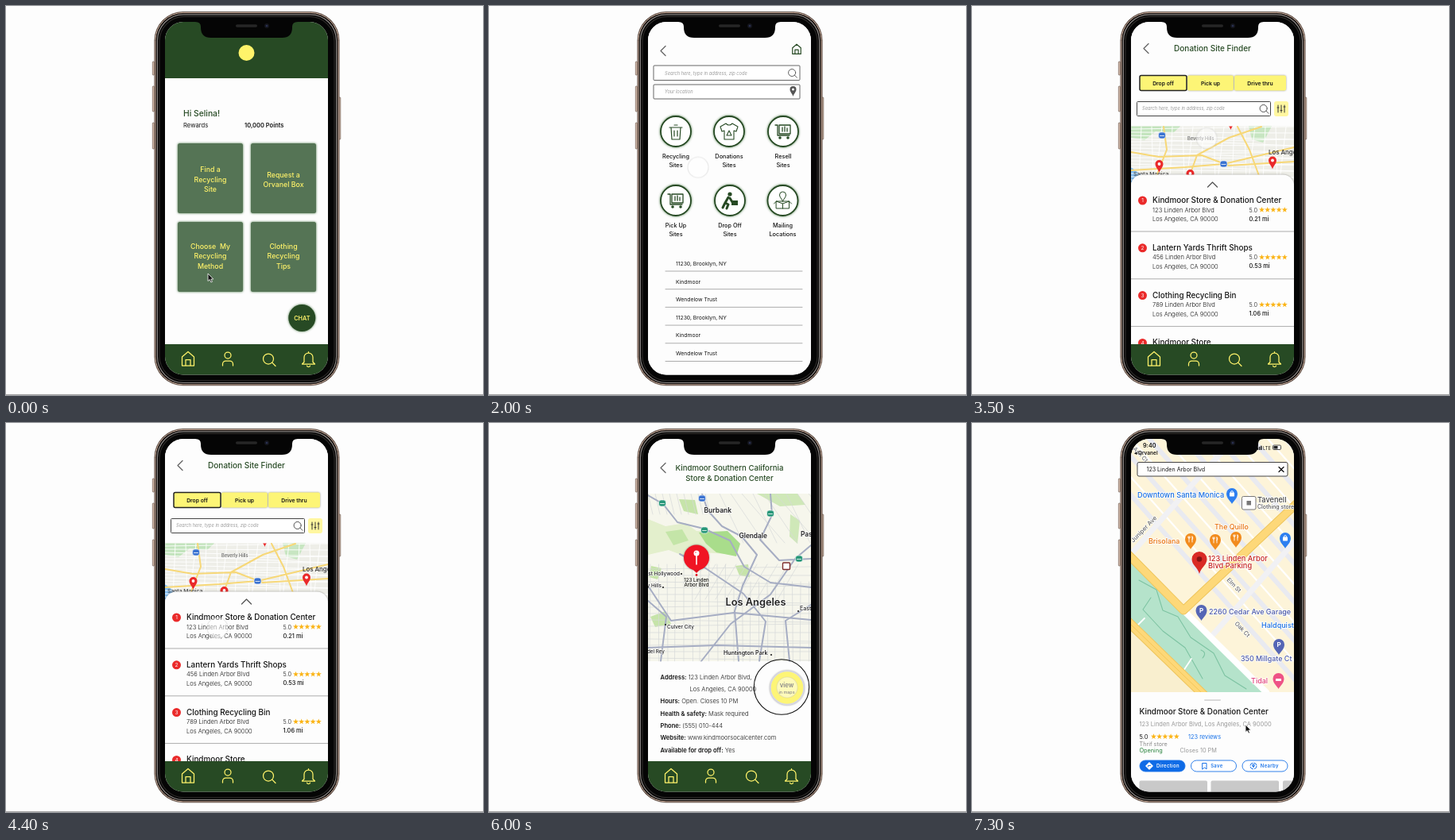
An HTML page that plays this animation: 600x490 px, repeating every 7400 ms.

```html
<!DOCTYPE html>
<html lang="en">
<head>
<meta charset="utf-8">
<title>Recycling app walkthrough</title>
<style>
html, body { margin: 0; width: 100%; height: 100%; overflow: hidden; background: #fdfdfd; }
svg { display: block; font-family: Inter, "Open Sans", sans-serif; }
text { white-space: pre; }
.glow { filter: drop-shadow(0 0 1.6px #4d7a4a); }
.soft { filter: drop-shadow(0 .6px 1.2px #0006); }
</style>
</head>
<body>
<svg id="stage" width="600" height="490" viewBox="0 0 600 490"></svg>
<script>
const LOOP = 7400, WIDTH = 205;
const GREEN = '#274a24', LEAF = '#557455', YELLOW = '#fdf576', LEMON = '#fff36a', RED = '#ea2a2a';

// Shape helpers, all returning SVG markup
const text = (x, y, size, str, o = {}) =>
  `<text x="${x}" y="${y}" font-size="${size}" font-weight="${o.w || 400}" fill="${o.fill || '#151515'}"` +
  ` text-anchor="${o.a || 'start'}" ${o.more || ''}>${str}</text>`;
const mid = (x, y, size, str, o = {}) => text(x, y, size, str, { ...o, a: 'middle' });
const box = (x, y, w, h, fill, r = 0, more = '') =>
  `<rect x="${x}" y="${y}" width="${w}" height="${h}" rx="${r}" fill="${fill}" ${more}/>`;
const dot = (x, y, r, fill, more = '') => `<circle cx="${x}" cy="${y}" r="${r}" fill="${fill}" ${more}/>`;
const area = (d, fill, more = '') => `<path d="${d}" fill="${fill}" ${more}/>`;
const line = (d, color = '#222', w = 1, more = '') =>
  `<path d="${d}" fill="none" stroke="${color}" stroke-width="${w}" stroke-linejoin="round" stroke-linecap="round" ${more}/>`;
const at = (x, y, inner, s = 1) => `<g transform="translate(${x} ${y}) scale(${s})">${inner}</g>`;
const outline = (color, w = 1) => `stroke="${color}" stroke-width="${w}"`;
const rule = (x1, x2, y, color = '#999') => line(`M${x1} ${y}H${x2}`, color, .8);

function stars(x, y) {
  let out = '';
  for (let i = 0; i < 5; i++) {
    const pts = Array.from({ length: 10 }, (_, k) => {
      const r = k % 2 ? 1.5 : 3.7, a = k * Math.PI / 5;
      return `${(x + i * 7.2 + r * Math.sin(a)).toFixed(2)},${(y - r * Math.cos(a)).toFixed(2)}`;
    });
    out += `<polygon points="${pts.join(' ')}" fill="#fbb416"/>`;
  }
  return out;
}

const HOUSE = 'M-7.5-2.5L0-9L7.5-2.5V8.5H-7.5ZM-3 8.5V1H3V8.5';
const LENS = 'M6 0a6.5 6.5 0 1 1-13 0a6.5 6.5 0 1 1 13 0M4.2 4.6L8.5 9';
const PERSON = 'M4-4.5a4 4 0 1 1-8 0a4 4 0 1 1 8 0M-6.5 8.5V6.5a4 4 0 0 1 4-4h5a4 4 0 0 1 4 4v2';
const BELL = 'M-5.5 4V-2a5.5 5.5 0 0 1 11 0V4L8 6.5H-8ZM-2 8.5a2 1.5 0 0 0 4 0M0-7.5V-9';
const pinMark = (x, y, s = 1, color = RED, core = '#fff') => at(x, y,
  area('M0 8C-1 4-5 1-5-3a5 5 0 0 1 10 0C5 1 1 4 0 8Z', color) + dot(0, -3, 1.9, core), s);
const back = line('M222 50.5L216 56.5L222 62.5', '#666', 1.3);
const shield = (x, y, color) => box(x - 4.5, y - 4, 9, 8, color, 3, outline('#fff', .6)) +
  rule(x - 2.5, x + 2.5, y + .5, '#fff');

const navBar = box(200, 426, WIDTH, 40, GREEN) +
  [HOUSE, PERSON, LENS, BELL].map((d, i) => at([229, 279, 330.5, 380.5][i], 444.5, line(d, LEMON, 1.25))).join('');
const paper = box(200, 20, WIDTH, 446, '#fdfdfd');

function homePage() {
  const card = (x, y, lines, first) => box(x, y, 82, 88, LEAF, 2.5, 'class="glow"') +
    lines.map((s, i) => mid(x + 41, first + i * 12.4, 8.8, s, { fill: LEMON, w: 500 })).join('');
  return paper + box(200, 20, WIDTH, 71, GREEN) + dot(302.5, 59, 10, LEMON) +
    text(223, 139, 10.3, 'Hi Selina!', { fill: GREEN, w: 500 }) +
    text(223, 153, 7.7, 'Rewards') + text(300, 153, 7.5, '10,000 Points', { w: 600 }) +
    card(216, 173, ['Find a', 'Recycling', 'Site'], 209.3) +
    card(308, 173, ['Request a', 'Orvanel Box'], 215.7) +
    card(216, 272, ['Choose  My', 'Recycling', 'Method'], 306) +
    card(308, 272, ['Clothing', 'Recycling', 'Tips'], 306) +
    dot(372.3, 393, 17, GREEN, 'class="glow"') + mid(372.3, 395.8, 7.3, 'CHAT', { fill: LEMON, w: 600 }) + navBar;
}

function sitesPage() {
  const shirt = line('M-4-10L-11-6L-9 0L-6-1V10H6V-1L9 0L11-6L4-10Q0-6-4-10ZM-3 5L0-1L3 5Z', GREEN, 1.1);
  const cart = line('M-10-8H-7V5H8M-5-8H9V3H-5ZM-1-5V0M2-6V0M5-4V0', GREEN, 1.3) + dot(-4, 8, 1.8, GREEN) + dot(6, 8, 1.8, GREEN);
  const carrier = dot(0, -8, 2.6, GREEN) + line('M-2-4L-6 3L-2 5L-4 10M-6 3L-9 9M0-3L3 2', GREEN, 3) + box(2, 0, 8, 6, GREEN);
  const parcel = line('M-8 1H8V10H-8ZM-8 1L-11 4M8 1L11 4M-8 1L0 4L8 1M0 4V10', GREEN, 1) + line('M0 1C-1-2-4-4-4-7a4 4 0 0 1 8 0C4-4 1-2 0 1Z', GREEN);
  const bin = line('M-6-5H6L5 10H-5ZM-8-5H8M-2-8H2M-2-1V6M2-1V6', GREEN, 1.2);
  const tile = (x, y, icon, name, kind) => dot(x, y, 19, '#fff', outline(GREEN, 1.8) + ' class="glow"') + at(x, y, icon) +
    mid(x, y + 34, 7.3, name, { w: 500 }) + mid(x, y + 45, 7.3, kind, { w: 500 });
  const field = (y, h) => box(207, y, 184, h, '#fff', 1, outline('#555', .9));
  const hint = { fill: '#999', more: 'font-style="italic"' };
  const rows = ['11230, Brooklyn, NY', 'Kindmoor', 'Wendelow Trust'];
  return paper + back + at(387, 54.5, line(HOUSE, GREEN, 1.7), .7) +
    field(75, 18.5) + text(221, 86.5, 5.7, 'Search here, type in address, zip code', hint) + at(381.5, 84, line(LENS, '#444', 1.2), .7) +
    field(99, 18) + text(221, 110, 5.7, 'Your location', hint) + pinMark(382.5, 107.5, .8, '#555') +
    tile(235, 158, bin, 'Recycling', 'Sites') + tile(302, 158, shirt, 'Donations', 'Sites') + tile(370, 158, cart, 'Resell', 'Sites') +
    tile(235, 245, cart, 'Pick Up', 'Sites') + tile(303, 245, carrier, 'Drop Off', 'Sites') + tile(369.5, 245, parcel, 'Mailing', 'Locations') +
    [...rows, ...rows].map((s, i) => text(235, 327 + i * 22.6, 6.8, s) + rule(222, 394, 334 + i * 22.7)).join('');
}

function cityMap() {
  let streets = '';
  for (let i = 0; i < 18; i++) streets += `M${200 + i * 13} 152l${i % 3 * 5 - 8} 68M200 ${155 + i * 4}l205 ${i % 4 * 4 - 3}`;
  return box(200, 151.5, WIDTH, 70, '#eeeee8') + area('M200 151.5H262L253 160L231 158L217 169L200 166Z', '#c3e4bd') +
    area('M348 151.5H377L366 172L352 168Z', '#c8e6c2') + area('M200 203L214 214V222H200Z', '#84bff2') +
    line(streets, '#fff', .9) +
    line('M200 184L235 190L289 188L323 201L405 196M241 152L245 181L229 222M274 213L283 188L323 166L364 152M334 152L349 181L364 222M200 207L268 203L317 199L405 178', '#f7d878', 2) +
    shield(239, 163, '#3b73d1') + shield(316.5, 199, '#3b73d1') +
    text(271, 168.5, 5.7, 'Beverly Hills', { fill: '#666', w: 500 }) + text(373, 187, 7.8, 'Los Angeles', { w: 600, fill: '#444' }) +
    text(203, 214, 6.8, 'Santa Monica', { w: 500, fill: '#444' }) +
    pinMark(325.5, 148) + box(318, 140, 15, 11.5, '#fdfdfd') + pinMark(235.5, 202) + pinMark(378, 197.5) + pinMark(274.5, 214);
}

function finderPage() {
  const chip = (x, w, label, edge) => box(x, 87.5, w, 19, YELLOW, 2, edge) + mid(x + w / 2, 99.5, 6.8, label, { w: 600 });
  const places = [['Kindmoor Store &amp; Donation Center', '123', '0.21 mi'], ['Lantern Yards Thrift Shops', '456', '0.53 mi'],
    ['Clothing Recycling Bin', '789', '1.06 mi'], ['Kindmoor Store', '246', '1.32 mi']];
  const place = ([name, no, far], i) => at(0, i * 59.8,
    dot(214.5, 245, 5.5, RED) + mid(214.5, 247.3, 6.5, i + 1, { fill: '#fff' }) + text(227, 248, 9.9, name, { w: 500 }) +
    text(227, 259.5, 7.6, no + ' Linden Arbor Blvd', { w: 300 }) + text(227, 271, 7.5, 'Los Angeles, CA 90000', { w: 300 }) +
    text(348.5, 259.5, 7.3, '5.0', { w: 300 }) + stars(364.5, 256.7) + text(348.5, 270.7, 7.4, far, { w: 500 }) + rule(200, 405, 284));
  return paper + at(0, -3, back) + mid(302.5, 57, 10, 'Donation Site Finder', { fill: GREEN, w: 500 }) +
    chip(271, 58, 'Pick up', 'class="soft"') + chip(330, 65, 'Drive thru', 'class="soft"') + chip(211, 59, 'Drop off', outline('#222', 1.5)) +
    box(207.5, 120.5, 168, 18, '#fff', 1, outline('#444')) +
    text(214, 131.3, 5.7, 'Search here, type in address, zip code', { fill: '#999', more: 'font-style="italic"' }) +
    at(367, 129, line(LENS, '#333', 1.2), .7) + box(380, 120, 18, 19, '#fff7a0', 3) +
    line('M385 125V134M389 125V134M393 125V134M384 128H386M388 131.5H390M392 127H394', '#333', 1) +
    cityMap() + box(200, 212.5, WIDTH, 270, '#fdfdfd', 14, 'class="soft"') + line('M296.5 228L302.5 222L308.5 228', '#555', 1.3) +
    places.map(place).join('') + navBar;
}

function regionMap() {
  let streets = '';
  for (let i = 0; i < 15; i++) streets += `M200 ${184 + i * 8}l205 ${i % 3 * 3 - 3}`;
  for (let i = 0; i < 20; i++) streets += `M${203 + i * 10.5} ${i < 10 ? 178 : 200}l${i % 3 - 1} 122`;
  for (let i = 0; i < 9; i++) streets += `M${290 + i * 14} 89l${30 + i % 3 * 12} 62M${285 + i * 13} 178l-26 44M${200 + i * 9} 89l6 26`;
  const city = (x, y, size, s, a = 'start') => text(x, y, size, s, { a, w: size > 7 ? 600 : 500, fill: '#222',
    more: 'stroke="#fff" stroke-width="1.2" paint-order="stroke"' });
  return box(200, 89, WIDTH, 211, '#f6f6ec') +
    area('M200 121L222 130L247 126L261 136L299 137L315 153L309 166L271 163L247 168L226 160L200 166Z', '#e3efcc') +
    area('M264 138L300 136L316 152L311 168L286 163L273 152Z', '#a9dd8b') + area('M222 137L243 134L251 148L232 154Z', '#c4e5a8') +
    area('M337 89H388L398 103L366 105ZM379 115L391 123L388 152L378 143Z', '#cfe8b8') +
    area('M239 96L259 97L263 115L245 111ZM310 180L326 178L328 194L315 192ZM203 244L222 237L229 253L209 257ZM204 180L217 183L212 197L201 194Z', '#c6e4a9') +
    line(streets, '#d6d9d9', .7) +
    line('M200 91L219 102L237 125L270 133L303 148L321 181L354 201L405 207M268 89L275 110L293 130L318 143L337 166L319 205L309 237L314 300M354 89L356 116L341 147L365 173L405 171M200 205L229 249L308 239L405 248M216 300L223 244L200 224M267 300L304 253L354 216L385 171L405 154M340 300L348 250L320 215L268 180L240 165M200 283L286 280L405 283M378 300L373 249L405 229', '#a6adc3', 2) +
    shield(218, 101, '#289779') + shield(354, 114, '#289779') + shield(271, 135, '#289779') + shield(390, 171, '#289779') +
    shield(268, 95, '#3b73d1') + box(369.5, 176, 9, 8.5, '#fff', 1, outline('#7d2c2c', 1.4)) +
    city(270.5, 112.5, 8.5, 'Burbank') + city(314.5, 144.5, 8.3, 'Glendale') + city(392, 143, 8.3, 'Pasadena') +
    city(240, 191.5, 6.4, 'West Hollywood', 'end') + city(217, 207, 6.4, 'Beverly Hills', 'end') + city(297.5, 230, 12.8, 'Los Angeles') +
    city(391, 236, 7, 'East LA') + city(224, 259, 6.4, 'Culver City') + city(295, 292, 7.1, 'Huntington Park') + city(221, 290, 6.3, 'Marina del Rey', 'end') +
    [[242, 190], [219, 207], [389, 237], [222, 254], [355, 292]].map(([x, y]) => dot(x, y, 1.1, '#222')).join('') +
    dot(261, 191.5, 1.4, '#d12') + area('M254 182L261 189L268 182Z', '#f01424') + dot(261, 169.5, 16, '#f01424', 'class="soft"') +
    dot(261, 164, 3.5, '#fff') + line('M261 166V178', '#fff', 1.6) + dot(260, 163, 1, '#f99') +
    mid(261, 199.5, 6.1, '123 Linden', { w: 500 }) + mid(261, 205.5, 6.1, 'Arbor Blvd', { w: 500 });
}

function detailPage() {
  const facts = [['Address:', '123 Linden Arbor Blvd,'], ['', 'Los Angeles, CA 90000'], ['Hours:', 'Open. Closes 10 PM'], ['Health &amp; safety:', 'Mask required'],
    ['Phone:', '(555) 010-444'], ['Website:', 'www.kindmoorsocalcenter.com'], ['Available for drop off:', 'Yes']];
  return paper + regionMap() + box(200, 20, WIDTH, 69, '#fdfdfd') + box(200, 300.5, WIDTH, 130, '#fdfdfd') + back +
    mid(302.5, 60, 9.6, 'Kindmoor Southern California', { fill: GREEN, w: 500 }) +
    mid(302.5, 73, 9.6, 'Store &amp; Donation Center', { fill: GREEN, w: 500 }) +
    facts.map(([k, v], i) => text(k ? 215.5 : 252.5, 322.7 + i * 15.3, 7.6, k ? `<tspan font-weight="600">${k}</tspan> ${v}` : v, { w: 300 })).join('') +
    dot(375, 333.5, 21, YELLOW, outline('#d7d8e6', 1.5) + ' class="soft"') +
    mid(374.5, 333, 7.8, 'view', { w: 600 }) + mid(374.5, 340.5, 5.4, 'in maps', { w: 500 }) + navBar;
}

function mapsPage() {
  const BLUE = '#1a6fe0', FOOD = '#e8710a', PARK = '#5566b5';
  const label = (x, y, s, fill, size = 8.9, more = '') => text(x, y, size, s, { fill, w: 500,
    more: 'stroke="#fff" stroke-width="1.6" paint-order="stroke" ' + more });
  const marker = (x, y, color, glyph) => at(x, y,
    area('M0 12C-2 8-7 5-7-1a7 7 0 0 1 14 0C7 5 2 8 0 12Z', color) + glyph);
  const fork = line('M-2-4V3M-3-4V-2H-1V-4M2-4V3M2-4Q4-2 2 0', '#fff', .9);
  const bag = box(-3, -2.5, 6, 5, '#fff', .7) + line('M-1.6-2.5a1.6 2 0 0 1 3.2 0', '#fff', .9);
  const letterP = mid(0, 2.4, 8, 'P', { fill: '#fff', w: 700 });
  let blocks = '', lanes = '';
  for (let i = -1; i < 8; i++) {
    blocks += `M${180 + i * 43} 20L${480 + i * 43} 358`;
    lanes += `M${200 + i * 43} 20L${500 + i * 43} 358`;
  }
  const pill = (x, w, s, fill, ink) => box(x, 425, w, 14, fill, 7, outline('#1a73e8', .9)) +
    text(x + 21, 434.3, 5.9, s, { fill: ink, w: 600, more: 'letter-spacing=".35"' });
  const battery = box(378.5, 28, 10, 5.5, '#fff', 1.3, outline('#222', .8)) + box(379.5, 29, 5, 3.5, '#222');
  return box(200, 20, WIDTH, 446, '#fdf4d9') + line(blocks, '#e9eaf0', 6) + line(lanes, '#fff', 2.2) +
    line('M200 165L290 63L330 20M240 339L405 150', '#f1f1f4', 7) +
    area('M200 166L266 236L365 339H200Z', '#b5e3cb') + area('M200 262L284 339H200Z', '#f9efcf') +
    line('M210 198L232 210L240 236L259 244L275 270L304 290L318 318L345 335M225 220L215 235L240 262L268 283L290 322M288 286q8 3 2 10', '#7dc3a2', 1.1) +
    line('M203 260L217 246M262 318L276 297', '#fff', 1.8) +
    line('M266 236L370 339', '#fff', 8) + line('M194 163L266 236L412 98', '#eec55c', 11) + line('M194 163L266 236L412 98', '#fdd879', 9) +
    line('M194 248L294 345', '#eec55c', 12) + line('M194 248L294 345', '#fdd879', 10) + line('M200 254L290 341', '#f4c657', 1) +
    label(203, 151, 'Juniper Ave', '#666', 7.6, 'transform="rotate(-46 203 151)"') +
    label(202, 33, 'Ash Ct', '#777', 7.4, 'transform="rotate(46 202 33)"') +
    label(320, 198, 'Elm St', '#666', 7.4, 'transform="rotate(46 320 198)"') + label(330, 253, 'Oak Ct', '#666', 7.4, 'transform="rotate(46 330 253)"') +
    label(208, 94, 'Downtown Santa Monica', BLUE, 9.2) + marker(327, 90, '#2d7ff0', bag) + marker(394, 146, '#2d7ff0', bag) +
    box(339.5, 92.5, 17.5, 16.5, '#fff', 2, outline('#777')) + box(345.5, 98, 5.5, 5.5, '#777') +
    label(359, 100, 'Tavenell', '#444', 9.2) + label(359, 108, 'Clothing store', '#555', 6.9) +
    label(305, 134, 'The Quillo', FOOD) + label(222, 151.5, 'Brisolana', FOOD) +
    marker(275, 147, '#f28b1d', fork) + marker(306, 148, '#f28b1d', fork) + marker(332, 145, '#f28b1d', fork) +
    area('M286 190C284 182 276.5 179 276.5 171.5a9.5 9.5 0 0 1 19 0C295.5 179 288 182 286 190Z', '#d92a25') + dot(286, 171.5, 3.3, '#861413') +
    label(297, 173.5, '123 Linden Arbor', '#c5221f', 9.2) + label(297, 183, 'Blvd Parking', '#c5221f', 9.2) +
    marker(288.5, 237, PARK, letterP) + label(298, 241, '2260 Cedar Ave Garage', '#4c5aa8', 9) +
    label(364, 258, 'Haldquist', BLUE, 9) + marker(386, 280, PARK, letterP) + label(338, 300, '350 Millgate Ct', '#4c5aa8', 8.9) +
    label(351, 328, 'Tidal', '#e2437c', 9) + marker(385.5, 323, '#ee5386', box(-3.5, -1, 7, 3, '#fff', .6)) +
    text(215, 30.5, 7.2, '9:40', { w: 600 }) + text(204, 39.5, 6.5, '◂ Orvanel', { w: 600 }) +
    [0, 1, 2, 3].map(i => box(356.5 + i * 2.2, 32 - i * 1.1, 1.5, 2 + i * 1.1, '#222')).join('') + text(366, 33.5, 5.8, 'LTE') + battery +
    box(208, 49.5, 189, 17.5, '#fff', 2, outline('#444')) + text(219.5, 61, 7.1, '123 Linden Arbor Blvd') + line('M386 55.5L392 61.5M392 55.5L386 61.5', '#111', 1.3) +
    box(200, 339, WIDTH, 130, '#fdfdfd') + box(292, 348.3, 21, 1.6, '#d5d5d5', .8) +
    text(210.5, 367, 9.9, 'Kindmoor Store &amp; Donation Center', { w: 500 }) +
    text(210.5, 382, 7.5, '123 Linden Arbor Blvd, Los Angeles, CA 90000', { fill: '#999' }) +
    text(210.5, 397.8, 7.4, '5.0') + stars(228.5, 395) + text(272, 397.8, 7.4, '123 reviews', { fill: '#1a73e8' }) +
    text(210.5, 406.5, 7.2, 'Thrif store', { fill: '#888' }) + text(210.5, 414.6, 7.3, 'Opening', { fill: '#26803a' }) + text(261.5, 414.6, 7.3, 'Closes 10 PM', { fill: '#999' }) +
    pill(211, 57, 'Direction', '#0f6be6', '#fff') + pill(275.5, 57, '  Save', '#fff', '#1a73e8') + pill(340, 57, ' Nearby', '#fff', '#1a73e8') +
    area('M223 427L228 432L223 437L218 432Z', '#fff') + line('M221.5 433V431.5H224.5', '#0f6be6', .9) + line('M290 428.5H295V436L292.5 434L290 436Z', '#1a73e8') +
    dot(354, 432, 4, 'none', outline('#1a73e8') + ' stroke-dasharray="5 1.3"') + pinMark(354, 432, .35, '#1a73e8') +
    box(210.5, 450.5, 85.5, 20, '#c9c9c9', 2) + box(300.5, 450.5, 85.5, 20, '#c9c9c9', 2) + box(391, 450.5, 30, 20, '#c9c9c9', 2);
}

const phone = [[184.3, 70, 17], [184.3, 101, 32], [184.3, 147, 33], [418.6, 115, 53]]
    .map(([x, y, h]) => box(x, y, 2.2, h, '#d9bfae', .8, outline('#5d4a41', .6))).join('') +
  box(186.8, 7.3, 232.4, 470.7, '#2b211d', 36, outline('#6b564b', .6)) +
  box(187.9, 8.4, 230.2, 468.5, '#120e0c', 35, outline('#d9bba9', 1)) +
  box(190.4, 10.8, 225.2, 463.7, '#050505', 33, outline('#8a8583', 1.2)) +
  box(193, 13.4, 220, 458.5, '#050505', 31, outline('#2b2927', 1.2));
const notch = area('M238 18H367V20Q360 20 360 26V27Q360 40 347 40H258Q245 40 245 27V26Q245 20 238 20Z', '#050505') +
  box(289, 23.3, 27, 3.4, '#262626', 1.7) + dot(328, 25, 3, '#15161d') + dot(328, 25, 1.3, '#2a3152');

const pages = [homePage, sitesPage, finderPage, detailPage, mapsPage];
const pageGroup = (page, i) => `<g id="page${i}"><g clip-path="url(#page)">${page()}</g></g>`;
document.getElementById('stage').innerHTML =
  `<defs><clipPath id="screen">${box(200, 20, WIDTH, 444.5, '#000', 23)}</clipPath>` +
  `<clipPath id="page">${box(200, 20, WIDTH, 446, '#000')}</clipPath></defs>` +
  box(0, 0, 600, 490, '#fdfdfd') + box(0, 489, 600, 1, '#a5a5a5') + phone +
  `<g clip-path="url(#screen)">${box(200, 20, WIDTH, 446, '#fdfdfd')}${pages.map(pageGroup).join('')}</g>` + notch +
  `<g id="ring">${dot(368, 332.5, 34.7, 'none', outline('#111', 1.1))}</g>` +
  `<g id="touch">${dot(0, 0, 13, '#fff', 'fill-opacity=".5" stroke="#bbb" stroke-opacity=".3" stroke-width="1.2"')}` +
  `<g id="press">${dot(0, 0, 12.5, '#c9c9c9', 'fill-opacity=".6"')}</g></g>` +
  `<g id="arrow">${area('M0 0V9.5L2.2 7.5L3.9 11L5.5 10.3L3.9 7H6.8Z', '#111', outline('#fff', .8))}</g>`;

// Rows are [ms, value, easing to the next row]
function play(id, prop, rows) {
  const frames = rows.map(([ms, value, easing = 'linear']) => ({ offset: ms / LOOP, [prop]: value, easing }));
  document.getElementById(id).animate(frames, { duration: LOOP, iterations: Infinity });
}
const shift = (x, y = 0) => `translate(${x}px, ${y}px)`;
const show = (id, rows) => play(id, 'opacity', rows.map(([ms, v]) => [ms, v, 'steps(1, end)']));

const pushes = [1237, 2956, 4480, 6300], PUSH = 400, EASE = 'cubic-bezier(.42, 0, .58, 1)';
pages.forEach((_, i) => {
  const enter = pushes[i - 1], leave = pushes[i];
  const rows = [[0, shift(enter ? WIDTH : 0)]];
  if (enter) rows.push([enter, shift(WIDTH), EASE], [enter + PUSH, shift(0)]);
  if (leave) rows.push([leave, shift(0), EASE], [leave + PUSH, shift(-WIDTH)]);
  rows.push([LOOP, shift(leave ? -WIDTH : 0)]);
  play('page' + i, 'transform', rows);
});

play('touch', 'transform', [[0, shift(256, 340)], [350, shift(256, 340), EASE], [1000, shift(256, 212)], [1800, shift(256, 212), EASE],
  [2500, shift(297, 161)], [3400, shift(297, 161), EASE], [4000, shift(266, 258)], [5050, shift(266, 258), EASE], [5650, shift(375, 333)], [LOOP, shift(375, 333)]]);
show('touch', [[0, 0], [350, 1], [6700, 0], [LOOP, 0]]);
show('press', [[0, 0], [1100, 1], [1500, 0], [LOOP, 0]]);
show('ring', [[0, 0], [5750, 1], [6300, 0], [LOOP, 0]]);
play('arrow', 'transform', [[0, shift(254, 337)], [350, shift(254, 337), 'steps(1, end)'], [6700, shift(370, 345), EASE], [7100, shift(344, 380)], [LOOP, shift(344, 380)]]);
show('arrow', [[0, 1], [350, 0], [6700, 1], [LOOP, 1]]);
</script>
</body>
</html>
```
